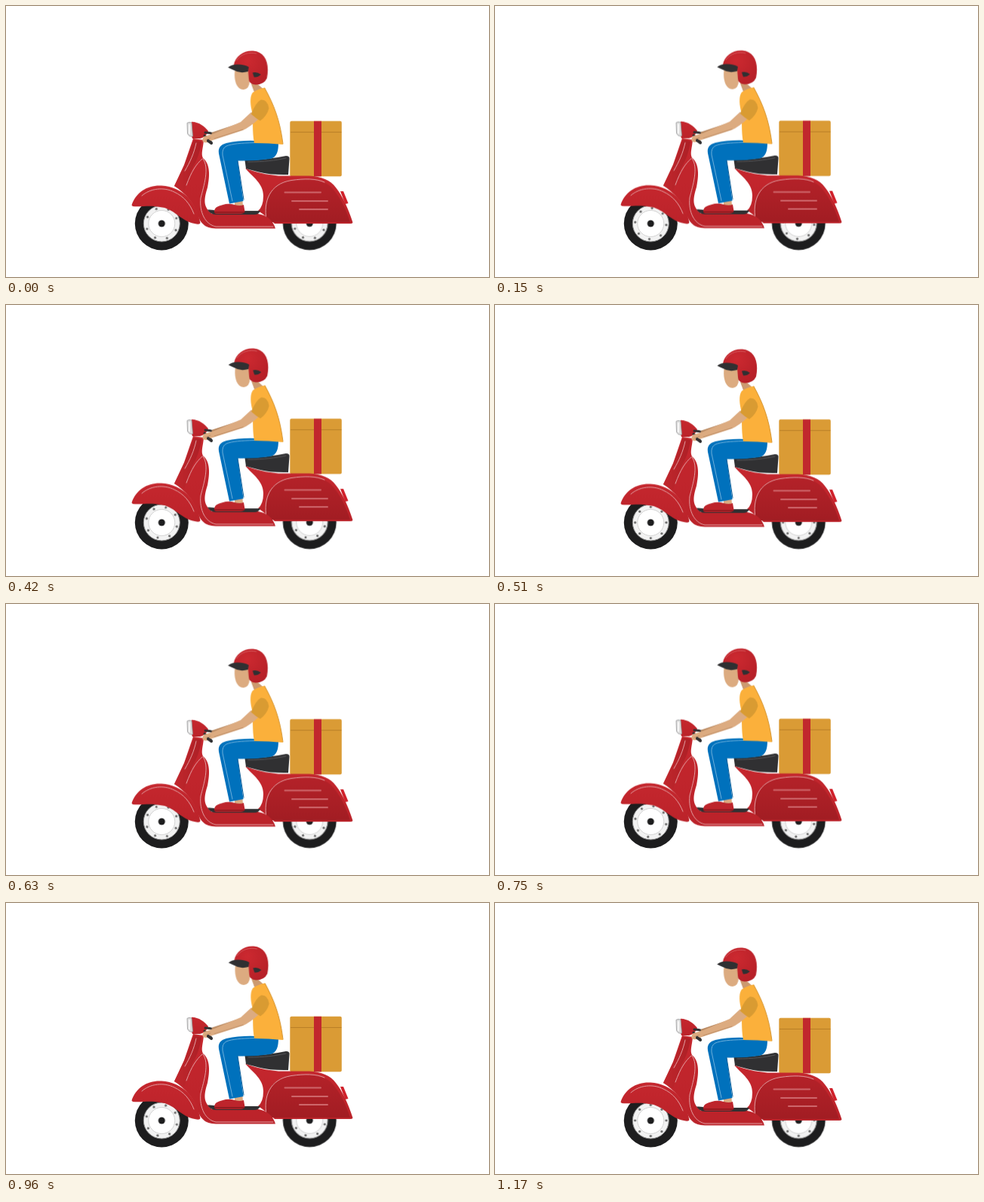
Write an HTML page that moves like this. It is 640x360 px and loops after 1.2 s.

```html
<!DOCTYPE html>
<html lang="en">
<head>
<meta charset="utf-8">
<title>Scooter delivery</title>
<style>
  html, body { margin: 0; width: 100%; height: 100%; overflow: hidden; background: #fff; }
  svg { display: block; width: 640px; height: 360px; }
  .bob { animation: bob .3s -.555s cubic-bezier(.37, 0, .63, 1) infinite alternate; }
  .lean { transform-origin: 330px 200px; animation: lean .3s -.555s cubic-bezier(.37, 0, .63, 1) infinite alternate; }
  .spin { animation: spin 1.2s linear infinite; }
  @keyframes bob { from { transform: translateY(.2px); } to { transform: translateY(-2.1px); } }
  @keyframes lean { from { transform: rotate(-.18deg); } to { transform: rotate(.18deg); } }
  @keyframes spin { to { transform: rotate(-360deg); } }
  .line { fill: none; stroke-linecap: round; stroke-linejoin: round; }
  .shine { stroke: #e3a0a3; stroke-width: 1; }
</style>
</head>
<body>
<svg viewBox="0 0 640 360">
  <defs>
    <linearGradient id="red" x1="0" y1="0" x2="0" y2="1">
      <stop offset="0" stop-color="#c5272e"/><stop offset="1" stop-color="#bb232a"/>
    </linearGradient>
    <linearGradient id="column" x1="0" y1="0" x2="1" y2="0">
      <stop offset="0" stop-color="#c1272d"/><stop offset="1" stop-color="#ad2026"/>
    </linearGradient>
    <linearGradient id="panel" x1="0" y1="0" x2="0" y2="1">
      <stop offset="0" stop-color="#b42229"/><stop offset="1" stop-color="#a21d23"/>
    </linearGradient>
    <radialGradient id="helmet" cx=".4" cy=".3" r=".8">
      <stop offset="0" stop-color="#cc2930"/><stop offset="1" stop-color="#b41f27"/>
    </radialGradient>
    <g id="wheel">
      <circle r="35.500" fill="#1d1d1e"/>
      <circle r="24" fill="#f2f2f2" stroke="#8c8c8c"/>
      <circle r="17.500" fill="#fff" stroke="#c9c9c9" stroke-width=".8"/>
      <g class="spin">
        <g id="pair"><circle cx="20.7" r="1.600" fill="#6a6a6a"/><circle cx="-20.7" r="1.600" fill="#6a6a6a"/></g>
        <use href="#pair" transform="rotate(45)"/>
        <use href="#pair" transform="rotate(90)"/>
        <use href="#pair" transform="rotate(135)"/>
      </g>
      <circle r="4.500" fill="#1d1d1e"/>
    </g>
  </defs>

  <use href="#wheel" x="206.3" y="289"/>
  <use href="#wheel" x="402.3" y="288.7"/>

  <g class="bob">
    <g id="box">
      <rect x="376.3" y="152.800" width="68.500" height="73.500" rx="2" fill="#da9b35"/>
      <path d="M377 167.500H444.500" stroke="#b97f27"/>
      <rect x="408" y="152.800" width="10" height="73.500" fill="#c1272d"/>
    </g>

    <g id="rear">
      <path d="M443 246H447L453.500 262L449.500 263Z" fill="#d0202a"/>
      <path d="M317 215.500C332 221 345 224 361 225.500H402C418 226.500 430 231 437 241C445 251 453 267 459.500 287.500Q459 289 456 289H356L340 276L334 272Q341 266 341 252C341 236 328 228 317 215.500Z" fill="url(#red)"/>
      <path d="M346 287C340 262 349 234 378 231C403 228 423 230 434 244C444 256 451 271 456 287Z" fill="url(#panel)"/>
      <path class="line shine" d="M345 283C341 260 349 236 378 231.500C396 229 411 229 422 234"/>
      <path class="line" stroke="#cf686d" stroke-width="2" d="M369.500 247.500H417M379 259H426M389 270H426"/>
    </g>
    <path d="M316.500 205Q345 204.500 371 199Q376 199 375.500 203L374 224Q350 224.500 335 220.500L318 216Z" fill="#303032"/>
    <path class="line" d="M321 207C342 207 357 205 371 202" stroke="#565658"/>

    <g id="front">
      <path d="M248 176L262 178C261 190 258 196 261 202C271 210 270 226 267 241C262 257 261 267 273 276H334Q352 279 357 295.500H278C263 295 258 288 254 278C249 261 238 249 223 239L236 211Z" fill="url(#red)"/>
      <path d="M249 178L259 180C257 194 253 205 247 215L236 246L223 239L236 212Z" fill="url(#column)"/>
      <path class="line shine" d="M260 203C252 210 246 219 239 238M261 203C270 215 262 239 258 255C256 274 264 290 278 293H354M252 182C249 196 244 207 237 219"/>
      <path d="M267 270.500Q274 270 280 272H337Q335 277 329 277H278Q271 277 267 270.500Z" fill="#303032"/>
      <path d="M166.500 264.500C172 247 188 237.500 206 238.500C235 240 253 262 257.500 288Q257 291 250 289C232 286 222 268 204 267C190 264 181 267 168 266Z" fill="url(#red)"/>
      <path class="line shine" d="M180 252C191 242 209 240 223 247C236 253 244 263 249 276"/>
      <path d="M246 153.800C256 154 263 160 268 166Q265 174 257 176L247 176Q242 164 246 153.800Z" fill="url(#red)"/>
      <path d="M240 155.300Q243 153.500 246 155L247.500 173Q242 174 240.500 169Z" fill="#dedede" stroke="#98989a" stroke-width=".8"/>
      <path d="M243 157V170" stroke="#fff" stroke-width="1.500"/>
      <path class="line" d="M264 168Q270 168 275 170M263 172L272 181" stroke="#303032" stroke-width="3"/>
    </g>

    <g id="rider">
      <path d="M303 253L313 253L314 266H303Z" fill="#dcab80"/>
      <path d="M276 273C276 266 284 265 291 263Q297 262 303 264Q310 266 315 264L316.500 273Q315 276 311 276H279Q276 276 276 273Z" fill="#bd252c"/>
      <path d="M276 274H316" stroke="#86171d" stroke-width="1.300"/>
      <path d="M361 181C361 193 359 201 350 203Q330 206 307 205.500L314.500 259L296 262.500L282 196Q280 185 292 182Q311 178 332 179Z" fill="#0071bc"/>
      <path class="line" d="M329 181.500C311 182 299 183 292 186Q286 189 287 198L300 259" stroke="#6fb0dc"/>
      <path class="line" d="M307 205.500L315 257" stroke="#075a96"/>
      <g class="lean">
        <path d="M325 103H333L342 111Q337 116 329 114Z" fill="#cc9a70"/>
        <path d="M303.500 86C302 99 306 111 315 111Q323 110 323 99V83Z" fill="#dcab80"/>
        <path d="M327 115Q334 110 343 108.500C355 131 363 151 367 184Q348 182 329 182C326 166 328 153 326 140C323 127 324 119 327 115Z" fill="#fbb03b"/>
        <path class="line" d="M343 109C355 131 363 151 367 183" stroke="#d4922c"/>
        <path class="line" d="M274 169L304 159" stroke="#b98a62" stroke-width="3"/>
        <path d="M325 141L311 154L276 169L263 173Q259 176 261 180Q265 183 271 179L314 165Q323 161 335 150Z" fill="#dcab80"/>
        <path class="line" d="M264 178L271 175M276 176L314 164" stroke="#b98a62" stroke-width=".8"/>
        <path d="M325 143.500Q331 128 338 124.500Q347 124 348.500 136Q346 146 337 152.500Q331 149 325 143.500Z" fill="#d99b32"/>
        <path d="M302 78.500C304 66 316 58.500 328 59.500C344 61 350 76 346 96Q342 104.500 331 104.500Q322 103.500 322 97L321 84Z" fill="url(#helmet)"/>
        <path d="M294.500 81.500Q299 77.500 307 77.500Q317 77.500 322 81L321 87Q310 90 302 85Q298 83 294.500 81.500Z" fill="#303032"/>
        <path d="M327 88.500Q333 87 338 91Q334 95 329 94.500Z" fill="#303032"/>
        <path class="line" d="M306 72C312 63 323 61 332 63" stroke="#d6565b"/>
      </g>
    </g>
    <path class="line" d="M268 179L272 182" stroke="#303032" stroke-width="4"/>
  </g>
</svg>
</body>
</html>
```
